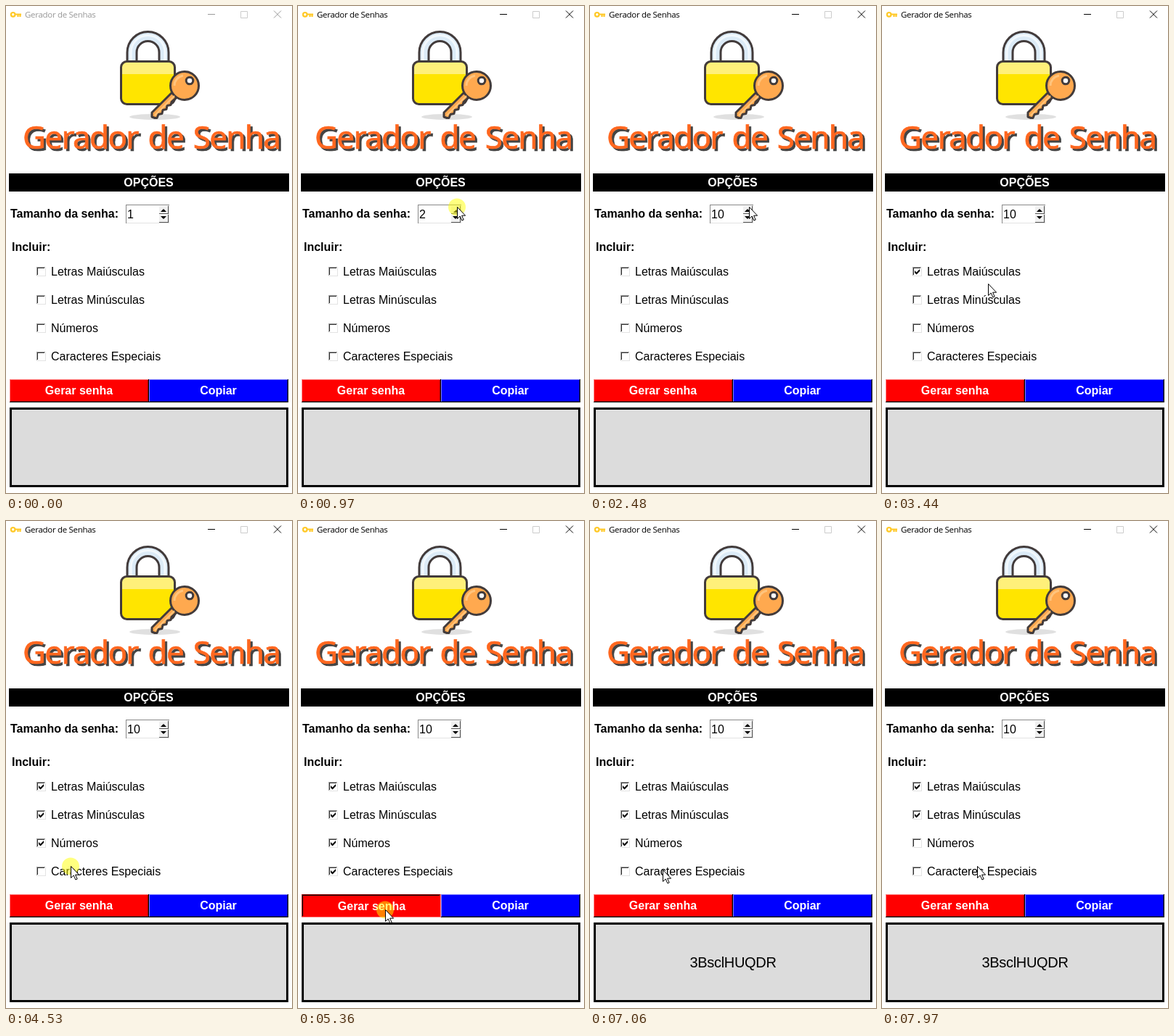
An HTML page that plays this animation: 394 by 672 pixels, repeating every 8 s.

```html
<!DOCTYPE html>
<html lang="pt">
<head>
<meta charset="utf-8">
<title>Gerador de Senhas</title>
<style>
html, body { margin: 0; width: 100%; height: 100%; overflow: hidden; background: #fff; }
svg { display: block; width: 394px; height: 672px; font: 16px "Liberation Sans", Arial, sans-serif; }
.bold { font-weight: bold; }
.mid { text-anchor: middle; }
.crisp { shape-rendering: crispEdges; }
.caption { font: 11.5px "Open Sans", "Noto Sans", sans-serif; letter-spacing: -.3px; }
.logo { font: 44px "Noto Sans", "Open Sans", sans-serif; letter-spacing: -1.7px; word-spacing: 4px; stroke-width: .7; }
.ink { stroke: #423b3b; stroke-width: 3; stroke-linejoin: round; }
</style>
</head>
<body>
<svg viewBox="0 0 394 672">
  <!-- title bar -->
  <g fill="none" stroke="#ffc928" stroke-width="2.2">
    <circle cx="9.7" cy="11.8" r="2.8"/><path d="M12.5 11.5H21M16.5 12v3M19.5 12v3"/>
  </g>
  <text id="caption" class="caption" x="26" y="16">Gerador de Senhas</text>
  <path d="M323.5 7.5h9v9h-9z" fill="none" stroke="#ccc"/>
  <path id="controls" d="M278 11.5h10M369 6.5l10 10M379 6.5l-10 10" fill="none"/>

  <!-- padlock and key -->
  <ellipse cx="205" cy="153" rx="35" ry="4" fill="#e0e0e0"/>
  <path class="ink" fill="#dcebf7" d="M167 80V64a28.5 28.5 0 0 1 57 0v16h-13V64a15.5 15.5 0 0 0-31 0v16z"/>
  <path d="M172 78V64a23.5 23.5 0 0 1 47 0v14" fill="none" stroke="#f3f9fd" stroke-width="3"/>
  <rect x="158.5" y="76.5" width="74" height="59" rx="8" fill="#ffe500"/>
  <path d="M160 94v-10q0-6 6-6h59q6 0 6 6v10z" fill="#fff07a"/>
  <rect class="ink" x="158.5" y="76.5" width="74" height="59" rx="8" fill="none"/>
  <path class="ink" fill="#ffa94f" d="M229 119l-28 28v6l4 1.5h3l2-5 5-1 1-5 5-1 1-5 5-1 1-4 8-7z"/>
  <circle class="ink" cx="246" cy="110" r="19.5" fill="#ffa94f"/>
  <path d="M232 110a14 14 0 0 1 12-14" fill="none" stroke="#ffc47d" stroke-width="3"/>
  <path d="M232 124l-27 27" stroke="#ffc47d" stroke-width="2"/>
  <circle class="ink" cx="253" cy="103" r="4.8" fill="#fff"/>
  <text class="logo" x="26" y="199.5" fill="#444" stroke="#444">Gerador de Senha</text>
  <text class="logo" x="23" y="196.5" fill="#ff671f" stroke="#ff671f">Gerador de Senha</text>

  <!-- options -->
  <rect class="crisp" x="4" y="231" width="386" height="25"/>
  <text class="bold mid" x="196.5" y="249" fill="#fff">OPÇÕES</text>
  <text class="bold" x="6" y="292">Tamanho da senha:</text>
  <g class="crisp">
    <path d="M165 274h60v26h-60z" fill="#e3e3e3"/>
    <path d="M165 300v-26h60v1h-59v25z" fill="#888"/>
    <path d="M166 275h57v24h-57z" fill="#fff"/>
    <path d="M211 276h12v11h-12zM211 288h12v11h-12z" fill="#f0f0f0"/>
    <path d="M211 286.5h12.5V276M211 298.5h12.5V288" fill="none" stroke="#555"/>
  </g>
  <path id="arrowUp" d="M213 284h8l-4-4z"/>
  <path d="M213 290h8l-4 4z"/>
  <text id="size" x="167" y="293"></text>
  <text class="bold" x="8" y="338">Incluir:</text>
  <g id="options"></g>

  <!-- buttons and result -->
  <g id="buttons"></g>
  <rect class="crisp" x="6.5" y="555.5" width="381" height="107" fill="#dcdcdc" stroke="#000" stroke-width="3"/>
  <text id="result" class="mid" x="197" y="616" font-size="20" letter-spacing="-.3">3BsclHUQDR</text>

  <g id="pointer">
    <circle id="halo" cy=".5" r="12" fill="#ff0" fill-opacity=".5"/>
    <path d="M.5.5v16l3.7-3.5 2.7 6 2.3-1-2.6-5.8h5z" fill="#fff" stroke="#000"/>
  </g>
</svg>
<script>
const LOOP = 8000, STEP = 70;
const el = id => document.getElementById(id);
const show = (node, on) => node.setAttribute('visibility', on ? 'visible' : 'hidden');

const labels = ['Letras Maiúsculas', 'Letras Minúsculas', 'Números', 'Caracteres Especiais'];
el('options').innerHTML = labels.map((label, i) => `
  <g transform="translate(42 ${360 + 39 * i})">
    <g class="crisp" fill="none">
      <path d="M.5 12V.5H12" stroke="#a0a0a0"/><path d="M1.5 11V1.5H11" stroke="#333"/>
      <path d="M1 12.5H12.5V1" stroke="#e3e3e3"/>
    </g>
    <path class="tick" d="M3 5l2.5 2.5L10 3v3l-4.5 4.5L3 8z"/>
    <text x="20" y="12">${label}</text>
  </g>`).join('');

// Bevel edges: outer and inner lines of the top-left and bottom-right corners
const button = (x, face, label) => `
  <g transform="translate(${x} 515)">
    <rect class="crisp" width="192" height="32" fill="${face}"/>
    <g class="crisp bevel" fill="none">
      <path d="M.5 31V.5H191"/><path d="M1.5 30V1.5H190"/>
      <path d="M1 30.5H190.5V1"/><path d="M0 31.5H191.5V0"/>
    </g>
    <text class="bold mid" x="95.5" y="21" fill="#fff">${label}</text>
  </g>`;
el('buttons').innerHTML = button(5, '#f00', 'Gerar senha') + button(197, '#00f', 'Copiar');

function setPressed(node, pressed, [light, face, dark]) {
  const colors = pressed ? [dark, '#000', face, light] : [light, face, dark, '#000'];
  [...node.querySelector('.bevel').children].forEach((edge, i) => edge.setAttribute('stroke', colors[i]));
  node.querySelector('text').setAttribute('transform', pressed ? 'translate(1 1)' : '');
}
const reds = ['#ff7f7f', '#f00', '#900'], blues = ['#7f7fff', '#00f', '#009'];
const [generate, copy] = el('buttons').children;
setPressed(copy, false, blues);
const ticks = [...document.querySelectorAll('.tick')];

// Pointer path: time, x, y
const path = [
  [70, 352, 655], [830, 222, 277], [900, 219, 277], [2740, 219, 277],
  [3100, 150, 364], [3240, 150, 364], [3440, 146, 383], [3580, 136, 399], [3790, 136, 399],
  [4040, 102, 440], [4150, 102, 440], [4400, 89, 476], [4610, 89, 476],
  [5230, 120, 536], [5690, 120, 536], [5760, 120, 535], [6160, 120, 535], [6230, 121, 533],
  [6430, 121, 533], [6780, 100, 481], [7060, 100, 481], [7270, 112, 446], [7410, 116, 438],
  [7550, 116, 438], [7970, 131, 476]
];

// Presses: start, length, and the checkbox toggled on release
const spins = Array.from({ length: 9 }, (_, i) => [900 + 185 * i, 95]);
const checks = [
  [3110, 90, 0], [3710, 75, 1], [4050, 90, 2], [4530, 80, 3], [6850, 80, 3], [7410, 80, 2]
];
const generatePress = [5360, 130];
const held = (t, [start, length]) => t >= start && t < start + length;

function pointerAt(t) {
  const i = path.findLastIndex(p => p[0] <= t);
  const [t0, x0, y0] = path[Math.max(i, 0)];
  const [t1, x1, y1] = path[Math.min(i + 1, path.length - 1)];
  const u = t1 > t0 ? Math.floor((t - t0) / STEP) * STEP / (t1 - t0) : 0;
  const k = u * u * (3 - 2 * u);
  return [Math.round(x0 + (x1 - x0) * k), Math.round(y0 + (y1 - y0) * k)];
}

function render(t) {
  const active = t >= spins[0][0];
  el('caption').setAttribute('fill', active ? '#000' : '#999');
  el('controls').setAttribute('stroke', active ? '#000' : '#999');

  el('size').textContent = 1 + spins.filter(s => t >= s[0]).length;
  el('arrowUp').setAttribute('transform', spins.some(s => held(t, s)) ? 'translate(1 1)' : '');
  ticks.forEach((tick, i) => {
    const toggles = checks.filter(([start, length, box]) => box === i && t >= start + length);
    show(tick, toggles.length % 2);
  });
  setPressed(generate, held(t, generatePress), reds);
  show(el('result'), t >= generatePress[0] + generatePress[1]);

  const visible = t >= path[0][0];
  show(el('pointer'), visible);
  show(el('halo'), [...spins, ...checks, generatePress].some(p => held(t, p)));
  if (visible) el('pointer').setAttribute('transform', `translate(${pointerAt(t)})`);
}

const begin = performance.now();
function tick() {
  render((performance.now() - begin) % LOOP);
  requestAnimationFrame(tick);
}
tick();
</script>
</body>
</html>
```
